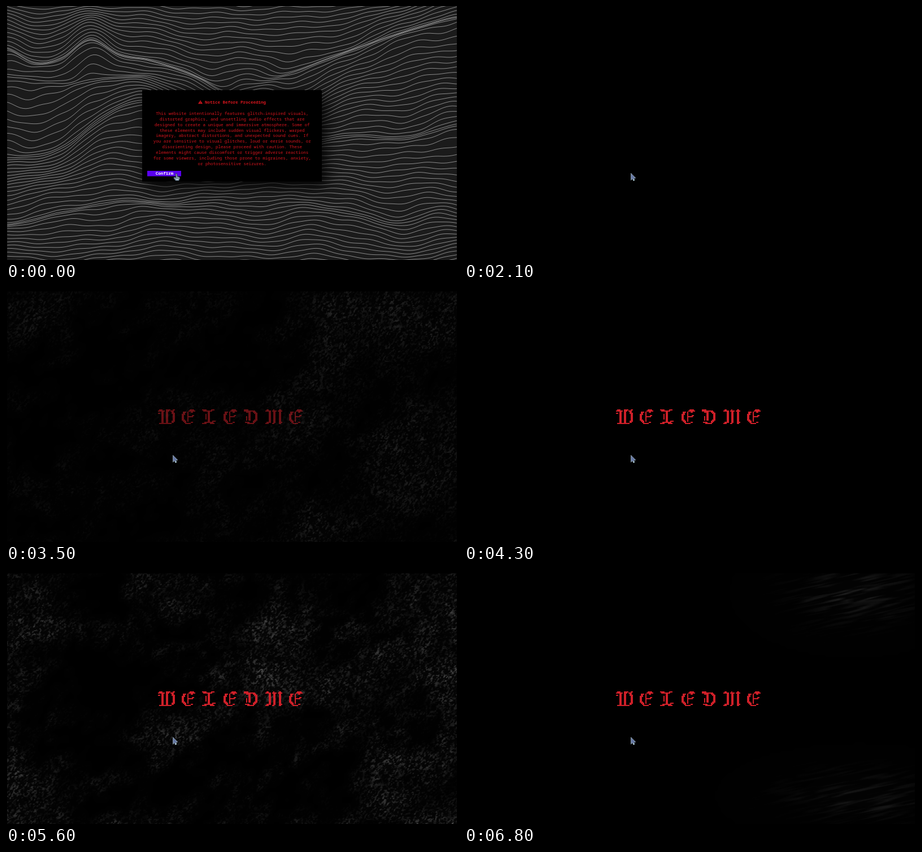
Animation of 800 by 450 pixels, one loop 6900 ms. Source, as an HTML page with a canvas:

```html
<!DOCTYPE html>
<html lang="en">
<head>
<meta charset="utf-8">
<title>Notice</title>
<style>
  html, body { margin: 0; width: 100%; height: 100%; overflow: hidden; background: #000; }
  canvas, svg { position: absolute; left: 0; top: 0; width: 800px; height: 450px; }
  text { font-family: "Noto Sans Mono", "DejaVu Sans Mono", monospace; font-size: 7.5px; white-space: pre; }
</style>
</head>
<body>
<canvas id="grunge" width="800" height="450"></canvas>
<svg viewBox="0 0 800 450">
  <defs>
    <filter id="blur" x="-30%" y="-40%" width="160%" height="180%"><feGaussianBlur stdDeviation="13"/></filter>
    <clipPath id="frame"><rect x="2" width="796" height="450"/></clipPath>
  </defs>
  <g id="intro">
    <rect width="800" height="450"/>
    <g clip-path="url(#frame)">
      <rect width="800" height="450" fill="#1b1b1b"/>
      <path id="waves" fill="none" stroke="#e4e4e4" stroke-width=".65" stroke-opacity=".85"/>
      <rect x="249" y="159" width="318" height="162" opacity=".85" filter="url(#blur)"/>
    </g>
    <rect x="241" y="149" width="318" height="162"/>
    <path d="M344 167L348 173.2H340Z" fill="#d3151d"/>
    <path d="M344 169V171M344 171.6V172.4" stroke="#000" stroke-width=".8"/>
    <text x="352" y="172.8" font-weight="700" fill="#d3151d">Notice Before Proceeding</text>
    <g id="notice" fill="#d8151e" text-anchor="middle" font-weight="500"></g>
    <rect x="250" y="292" width="60" height="9.6" fill="#5a00f0"/>
    <text x="280.6" y="299.3" text-anchor="middle" font-weight="700" fill="#fff">Confirm</text>
  </g>
  <path id="welcome" fill="#cf2029" shape-rendering="crispEdges" transform="translate(269 215) scale(2)"/>
  <g id="hand">
    <path d="M300 297H302.6L303.4 302L307 303L308 305L306 309.5H300L296.5 304.5L298 303L300.6 304Z" fill="#8197ab" stroke="#26303c" stroke-width=".7"/>
    <path d="M301 307.6H305" stroke="#cfeaf0" stroke-width="1.2"/>
  </g>
  <g id="arrow">
    <path d="M295.5 296.3V308.6L298.2 306L299.8 309.6L301.8 308.8L300.6 305.3L303.8 304.8Z" fill="#6678a4" stroke="#a3b3bd" stroke-width=".7"/>
    <circle cx="300.6" cy="308.3" r="1" fill="#c9f0ee"/>
  </g>
</svg>
<script>
const LOOP = 6900, STEP = 100, W = 800, H = 450;
const $ = id => document.getElementById(id);
const clamp = v => Math.max(0, Math.min(1, v));
const ease = (a, b, v) => { const k = clamp((v - a) / (b - a)); return k * k * (3 - 2 * k); };
const bell = v => Math.exp(-v * v);

// ---- notice text
const lines = [
  'This website intentionally features glitch-inspired visuals,',
  'distorted graphics, and unsettling audio effects that are',
  'designed to create a unique and immersive atmosphere. Some of',
  'these elements may include sudden visual flickers, warped',
  'imagery, abstract distortions, and unexpected sound cues. If',
  'you are sensitive to visual glitches, loud or eerie sounds, or',
  'disorienting design, please proceed with caution. These',
  'elements might cause discomfort or trigger adverse reactions',
  'for some viewers, including those prone to migraines, anxiety,',
  'or photosensitive seizures.'
];
$('notice').innerHTML = lines
  .map((s, i) => `<text x="400.3" y="${(192.6 + i * 9.97).toFixed(2)}">${s}</text>`).join('');

// ---- terrain lines, bent along and squeezed towards a few ridges
const ridges = [
  { mid: 100, reach: 80, squeeze: .86, from: -200, to: 410, start: 0, step: 50, ys: [72, 92, 88, 60, 88, 98, 114, 132, 160] },
  { mid: 0, reach: 0, squeeze: .7, from: -200, to: 260, start: 0, step: 100, ys: [114, 128, 138, 140] },
  { mid: 90, reach: 110, squeeze: .86, from: 450, to: 1000, start: 400, step: 100, ys: [150, 120, 82, 48, 20] },
  { mid: 215, reach: 75, squeeze: .6, from: -200, to: 300, start: 0, step: 100, ys: [268, 250, 180, 165] },
  { mid: 362, reach: 60, squeeze: .7, from: -200, to: 330, start: 0, step: 100, ys: [388, 366, 346, 352] },
  { mid: 235, reach: 60, squeeze: .7, from: 560, to: 1000, start: 500, step: 100, ys: [258, 230, 234, 212] },
  { mid: 370, reach: 70, squeeze: .5, from: 520, to: 760, start: 500, step: 100, ys: [345, 366, 384, 350] }
];

function curve(ys, u) {
  const last = ys.length - 1;
  u = Math.max(0, Math.min(last, u));
  const i = Math.min(last - 1, Math.floor(u)), f = u - i;
  const at = j => ys[Math.max(0, Math.min(last, j))];
  const a = at(i - 1), b = at(i), c = at(i + 1), d = at(i + 2);
  return b + f / 2 * (c - a + f * (2 * a - 5 * b + 4 * c - d + f * (3 * (b - c) + d - a)));
}

function terrain(x, base) {
  let y = base + 4 * Math.sin(x / 47 + base / 38) + 2.5 * Math.sin(x / 21 - base / 29)
    + 6 * Math.sin(x / 92 + base / 61) + .8 * Math.sin(x / 9 + base / 7);
  for (const r of ridges) {
    const fade = ease(r.from - 70, r.from + 70, x) * (1 - ease(r.to - 70, r.to + 70, x));
    if (!fade) continue;
    const c = curve(r.ys, (x - r.start) / r.step);
    if (r.reach) y += (c - r.mid) * fade * bell((y - r.mid) / r.reach);
    const d = y - c;
    y -= fade * r.squeeze * d * bell(d / 24);
  }
  return y;
}

let wave = '';
for (let base = -80; base < 540; base += 7.2) {
  for (let x = 0; x <= W; x += 5) wave += (x ? 'L' : 'M') + x + ' ' + terrain(x, base).toFixed(1);
}
$('waves').setAttribute('d', wave);

// ---- blackletter word: pen strokes snapped to square cells
const glyphs = {
  W: ['M4 1V11M8 1V12M12 1L14 4V10L12 12',
      'M0 1.5H6M1 .5H4M0 3.5H2M7 .5H11M9 1.5H10M13 .5H15M1 12.5H12M3 11.5H5'],
  E: ['M4 2L2 5V9L5 12',
      'M6.5 2V11M7 1.5H13M8 .5H12M9 2.5H11M7 6.5H11M10 5.5H12M4 12.5H9L11 10.5'],
  L: ['M6 1V11',
      'M0 .5H4M1 1.5H6M8 .5H11M7 1.5H9M3.5 4V9M0 12.5H4M2 11.5H10M7 12.5H11M9 10.5H12'],
  O: ['M5 2V10M8 1L11 4V9L8 12',
      'M0 .5H4M0 1.5H9M2 2.5H4M2.5 6V10M1 11.5H5M3 12.5H9'],
  M: ['M4 1V11M8 1V11M13 1V11',
      'M0 1.5H5M1 .5H3M6 1.5H10M7 .5H8M11 1.5H15M12 .5H14M1 11.5H5M0 12.5H3M7 11.5H9M6 12.5H8M12 11.5H15M12 12.5H14']
};

function makeCanvas(w, h) {
  const c = document.createElement('canvas');
  c.width = w; c.height = h;
  return c;
}

function wordPath(word, offsets) {
  const w = 130, h = 14, g = makeCanvas(w, h).getContext('2d');
  [...word].forEach((ch, i) => {
    // the second C shares the shape of E
    const [thick, thin] = glyphs[ch === 'C' ? 'E' : ch];
    g.setTransform(1, 0, 0, 1, offsets[i], 0);
    g.lineWidth = 2; g.stroke(new Path2D(thick));
    g.lineWidth = 1; g.stroke(new Path2D(thin));
  });
  const px = g.getImageData(0, 0, w, h).data;
  let d = '';
  for (let y = 0; y < h; y++)
    for (let x = 0; x < w; x++)
      if (px[(y * w + x) * 4 + 3] > 120) d += `M${x} ${y}h1v1h-1z`;
  return d;
}
$('welcome').setAttribute('d', wordPath('WELCOME', [0, 20, 39, 57, 76, 95, 115]));

// ---- grunge
function hash(x, y) {
  let h = Math.imul(x, 374761393) + Math.imul(y, 668265263) | 0;
  h = Math.imul(h ^ h >>> 13, 1274126177);
  return ((h ^ h >>> 16) >>> 0) / 4294967296;
}

function noise(x, y) {
  const i = Math.floor(x), j = Math.floor(y);
  let u = x - i, v = y - j;
  u *= u * (3 - 2 * u); v *= v * (3 - 2 * v);
  const a = hash(i, j), b = hash(i, j + 1);
  const top = a + (hash(i + 1, j) - a) * u;
  const low = b + (hash(i + 1, j + 1) - b) * u;
  return top + (low - top) * v;
}

function paint(ctx, w, h, shade) {
  const img = ctx.createImageData(w, h);
  for (let y = 0, p = 0; y < h; y++)
    for (let x = 0; x < w; x++, p += 4) {
      const [r, g, b] = shade(x, y);
      img.data[p] = r; img.data[p + 1] = g; img.data[p + 2] = b; img.data[p + 3] = 255;
    }
  ctx.putImageData(img, 0, 0);
}

const flakes = makeCanvas(W, H);
paint(flakes.getContext('2d'), W, H, (x, y) => {
  const n = .6 * noise((x + y * .5) / 2.6, y / 3.4) + .4 * noise(x / 1.6 + 90, y / 1.7);
  const v = 6 + ease(.45, .75, n) * (22 + 60 * noise(x / 7 + 40, y / 7));
  return [v, v, v];
});

const ctx = $('grunge').getContext('2d');
const pattern = ctx.createPattern(flakes, 'repeat');
const CELL = 5, MW = W / CELL, MH = H / CELL;
const mask = makeCanvas(MW, MH), maskCtx = mask.getContext('2d');

function clouds(x, y, t) {
  const s = t / 1000, slant = x + y * .4;
  const n = .42 * noise(slant / 110 + s * 1.3, y / 95 + s * .7 + 20)
    + .33 * noise(slant / 42 - s, y / 38 + 60 + s * 1.1)
    + .25 * noise(slant / 14 + s * 3, y / 15 + 30);
  const edge = ((x - 400) / 400) ** 2 * .14 + .06 * ease(350, 650, x);
  const hollow = .25 * bell(Math.hypot(x - 170, y - 210) / 150);
  return ease(.34, .98, n + edge - hollow);
}

const spot = (x, y, cx, cy, rx, ry) => bell(Math.hypot((x - cx) / rx, (y - cy) / ry));
const earlyGlow = (x, y) => spot(x, y, 15, 295, 55, 70) + .6 * spot(x, y, 795, 36, 28, 26);
const lateGlow = (x, y) => spot(x, y, 690, 40, 95, 50) + spot(x, y, 700, 400, 110, 40);

function drawGrunge(t) {
  ctx.setTransform(1, 0, 0, 1, 0, 0);
  ctx.globalCompositeOperation = 'source-over';
  ctx.fillStyle = '#000';
  ctx.fillRect(0, 0, W, H);
  if (t < 2300) return;

  const early = t < 3100, late = t >= 6500, streaky = early || late;
  const level = early ? .3 * ease(2200, 2600, t)
    : late ? .75 - (t - 6500) / 900
    : t < 4400 ? .45 * ease(3000, 3500, t) * (1 - ease(3800, 4250, t))
    : ease(4300, 4900, t) * (1 - .25 * ease(6200, 6500, t));
  if (level <= 0) return;

  const k = t / STEP;
  ctx.save();
  ctx.beginPath();
  ctx.rect(2, 6, W - 4, H - 6);
  ctx.clip();
  if (streaky) {
    ctx.translate(400, 225);
    ctx.rotate(early ? .06 : -.2);
    ctx.scale(14, 1.2);
  }
  ctx.translate(hash(k, 3) * W, hash(k, 8) * H);
  ctx.fillStyle = pattern;
  ctx.fillRect(-2 * W, -3 * H, 4 * W, 6 * H);
  ctx.restore();

  paint(maskCtx, MW, MH, (i, j) => {
    const x = (i + .5) * CELL, y = (j + .5) * CELL;
    const glow = early ? earlyGlow(x, y) : late ? lateGlow(x, y) : clouds(x, y, t);
    const v = 255 * clamp(glow * level);
    return early ? [v, v * .65, v * .65] : [v, v, v];
  });
  ctx.globalCompositeOperation = 'multiply';
  ctx.drawImage(mask, 0, 0, W, H);
}

// ---- timeline
function render(t) {
  $('intro').setAttribute('opacity', clamp((800 - t) / 300));
  $('hand').setAttribute('opacity', t < 600 ? 1 : 0);
  $('arrow').setAttribute('opacity', t < 600 ? 0 : 1);
  $('welcome').setAttribute('opacity', ease(3000, 4000, t));
  drawGrunge(t);
}

let shown = -1;
const begin = performance.now();
function tick() {
  const t = Math.floor((performance.now() - begin) % LOOP / STEP) * STEP;
  if (t !== shown) render(shown = t);
  requestAnimationFrame(tick);
}
tick();
</script>
</body>
</html>
```
